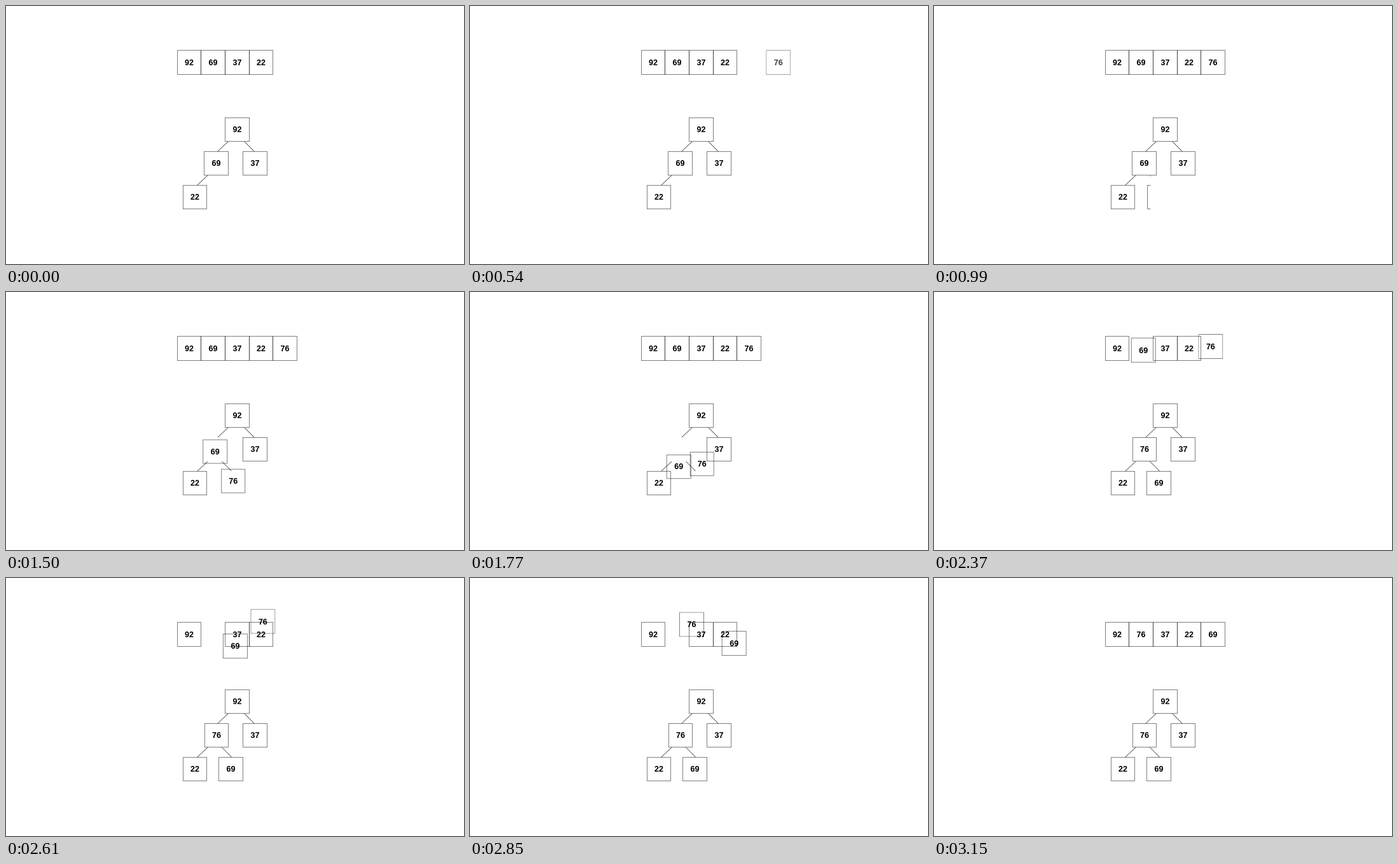
Animation, 720 px wide and 405 px high, one loop 3630 ms. Source, as an HTML page:

```html
<!DOCTYPE html>
<html lang="en">
<head>
<meta charset="utf-8">
<title>Heap insertion</title>
<style>
  html, body { margin: 0; width: 100%; height: 100%; overflow: hidden; background: #fff; }
  #stage { position: relative; width: 720px; height: 405px; overflow: hidden; }

  .tile {
    position: absolute;
    left: calc(var(--x, 0) * 1px);
    top: calc(var(--y, 0) * 1px);
    width: calc(var(--w, 39) * 1px);
    height: calc(var(--h, 38) * 1px);
    box-sizing: border-box;
    border: 1px solid rgba(0, 0, 0, .5);
    display: flex;
    align-items: center;
    justify-content: center;
    font: bold 12.5px "Liberation Sans", Arial, sans-serif;
    color: #000;
  }
  .array { --h: 39; }
  .array:not(.mover) { --y: 69; }

  svg { position: absolute; left: 0; top: 0; }
  path { stroke: #333; stroke-width: 1; fill: none; }

  /* Movers follow a path given for their centre. */
  .mover { offset-rotate: 0deg; offset-distance: 0%; }
  .array.mover { animation: array-swap 3630ms infinite; }
  .node.mover { animation: tree-swap 3630ms infinite; }

  #array69 { offset-path: path("M325.5 88.5 Q382 131.5 438.5 88.5"); }
  #array76 {
    offset-path: path("M438.5 88.5 Q382 40.5 325.5 88.5");
    animation: array-swap 3630ms infinite, slide-in 3630ms infinite;
  }
  #node69 { offset-path: path("M330.5 247 c-12 20 3 46 23 53"); }
  #node76 { offset-path: path("M354 300 c22 -20 11 -53 -23 -53"); }

  /* White cover that shrinks to reveal the new node and its edge. */
  #cover {
    position: absolute;
    left: 335px; top: 266px;
    width: 38px; height: 54px;
    background: #fff;
    transform-origin: right;
    animation: reveal 3630ms infinite;
  }

  /* 230 to 850 ms */
  @keyframes slide-in {
    0%, 6.336% {
      translate: 186px 0; opacity: 0;
      animation-timing-function: cubic-bezier(.333, .667, .667, 1);
    }
    23.416%, 100% { translate: 0 0; opacity: 1; }
  }

  /* 875 to 1300 ms, quadratic ease in and out */
  @keyframes reveal {
    0%, 24.105% { transform: scaleX(1); animation-timing-function: cubic-bezier(.333, 0, .667, .333); }
    29.959% { transform: scaleX(.5); animation-timing-function: cubic-bezier(.333, .667, .667, 1); }
    35.813%, 100% { transform: scaleX(0); }
  }

  /* 1342 to 2265 ms */
  @keyframes tree-swap {
    0%, 36.97% { offset-distance: 0%; animation-timing-function: cubic-bezier(.333, 0, .667, .333); }
    49.683% { offset-distance: 50%; animation-timing-function: cubic-bezier(.333, .667, .667, 1); }
    62.397%, 100% { offset-distance: 100%; }
  }

  /* 2250 to 3150 ms */
  @keyframes array-swap {
    0%, 61.983% { offset-distance: 0%; animation-timing-function: cubic-bezier(.333, 0, .667, .333); }
    74.38% { offset-distance: 50%; animation-timing-function: cubic-bezier(.333, .667, .667, 1); }
    86.777%, 100% { offset-distance: 100%; }
  }
</style>
</head>
<body>
<div id="stage">
  <svg width="720" height="405">
    <path d="M349 213 L333 228 M375 213 L390 228 M317 266 L301 281 M339.5 266 L354.5 281"/>
  </svg>

  <div class="tile array" style="--x:269; --w:38">92</div>
  <div class="tile array" style="--x:344">37</div>
  <div class="tile array" style="--x:382; --w:38">22</div>
  <div class="tile array mover" id="array69">69</div>
  <div class="tile array mover" id="array76">76</div>

  <div class="tile node" style="--x:344; --y:175">92</div>
  <div class="tile node" style="--x:372; --y:228">37</div>
  <div class="tile node" style="--x:278; --y:281; --w:38">22</div>
  <div class="tile node mover" id="node69">69</div>
  <div class="tile node mover" id="node76" style="--w:38">76</div>
  <div id="cover"></div>
</div>
</body>
</html>
```
